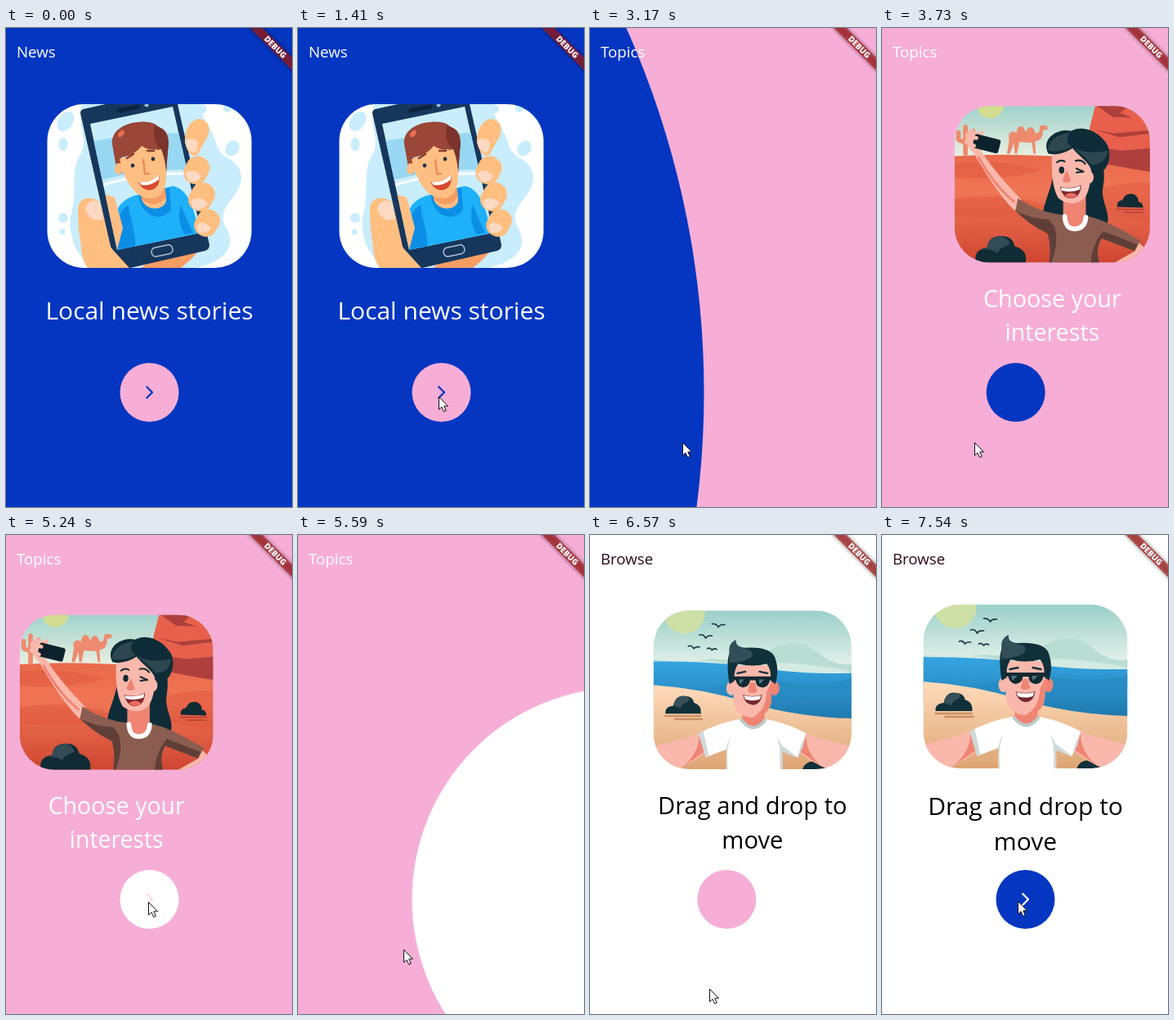
Write an HTML page that moves like this. It is 350 px wide and 585 px high and loops after 8 s.

```html
<!DOCTYPE html>
<html lang="en">
<head>
<meta charset="utf-8">
<title>Onboarding</title>
<style>
  html, body { margin: 0; width: 100%; height: 100%; overflow: hidden; }
  svg { display: block; width: 350px; height: 585px; }
  text { font-family: "Open Sans", "Noto Sans", sans-serif; font-weight: 440; }
  .head { font-size: 30px; text-anchor: middle; fill: #fff; }
  .dark { fill: #000; }
  #title { font-size: 18.7px; }
  #debug { font-size: 9.8px; font-weight: 800; text-anchor: middle; fill: #fff; }
  .line { fill: none; stroke-linecap: round; stroke-linejoin: round; }
</style>
</head>
<body>
<svg viewBox="0 0 350 585">
  <defs>
    <clipPath id="card"><rect width="250" height="200" rx="45"/></clipPath>
    <clipPath id="screen"><path d="M103 117L204 96L239 250L136 271Z"/></clipPath>
    <linearGradient id="dusk" x2="0" y2="1"><stop stop-color="#9fd2cc"/><stop offset="1" stop-color="#f0f2e2"/></linearGradient>
    <linearGradient id="desert" x2="0" y2="1"><stop stop-color="#e9694b"/><stop offset=".35" stop-color="#f07555"/><stop offset="1" stop-color="#cf4631"/></linearGradient>
    <linearGradient id="air" x2="0" y2="1"><stop stop-color="#9ad0c8"/><stop offset="1" stop-color="#f3f8f2"/></linearGradient>
    <linearGradient id="sea" x2="0" y2="1"><stop stop-color="#35a5e2"/><stop offset="1" stop-color="#1f78ad"/></linearGradient>
    <linearGradient id="sand" x2="0" y2="1"><stop stop-color="#ffdcbc"/><stop offset="1" stop-color="#dda473"/></linearGradient>
    <filter id="soft" x="-20%" y="-80%" width="140%" height="260%"><feGaussianBlur stdDeviation="2.6"/></filter>
  </defs>

  <rect id="bg" width="350" height="585"/>
  <circle id="disc"/>
  <path id="arrow" class="line" stroke-width="2.3" d="M172.3 438.3L179 445L172.3 451.7"/>

  <g class="page">
    <g transform="translate(50.5 93)"><g clip-path="url(#card)"><g transform="translate(-50.5 -93)">
      <path fill="#fff" d="M50 92h252v202H50z"/>
      <g fill="#c9edfc">
        <path d="M93 93C86 120 101 132 92 153C78 172 87 200 81 222C73 250 86 285 112 293L232 293C274 284 282 262 268 242C257 217 288 207 288 182C286 156 262 164 257 140C250 118 240 112 236 93Z"/>
        <ellipse cx="73" cy="114" rx="9" ry="13" transform="rotate(35 73 114)"/>
        <ellipse cx="70" cy="142" rx="5.5" ry="8"/>
        <ellipse cx="277" cy="147" rx="8" ry="10" transform="rotate(35 277 147)"/>
        <ellipse cx="237" cy="99" rx="9" ry="6"/>
        <circle cx="271" cy="98" r="5"/><circle cx="70" cy="232" r="6"/><circle cx="69" cy="249" r="3.5"/>
      </g>
      <path fill="#f79d62" d="M208 262L248 252C238 272 228 282 214 293H165Z"/>
      <path fill="#ffbf80" d="M88 222C88 206 104 204 114 214L136 270L150 293H100C90 265 88 245 88 222Z"/>
      <path fill="#17365c" d="M91 104Q91 100 95 99L122 93H210L249 265Q249 270 244 272L152 293H134Z"/>
      <path class="line" stroke="#0c2440" stroke-width="5" d="M138 101L162 96"/>
      <circle cx="172" cy="94" r="2.5" fill="#9fb9cf"/>
      <g clip-path="url(#screen)">
        <path fill="#c9edfb" d="M95 90h150v190H95z"/>
        <path fill="#98d8f2" d="M100 139Q150 130 215 128L222 173Q165 172 116 186Z"/>
        <path class="line" stroke="#fff" stroke-width="3" d="M112 194Q165 176 226 178"/>
        <path fill="#1eb1f9" d="M132 262C128 222 140 208 164 203L204 193C220 196 228 210 238 255L136 275Z"/>
        <path fill="#0d8ee6" d="M136 271L132 250C138 228 142 220 150 216C152 236 160 252 158 267ZM218 252Q208 232 214 216Q222 236 229 250ZM163 203C162 228 190 240 202 222L200 195Z"/>
        <path fill="#ffbd82" d="M165 191L166 209C172 226 196 222 196 210L193 186Z"/>
        <path fill="#f79d62" d="M165 199Q184 215 194 194L196 206Q184 223 166 209Z"/>
        <path fill="#ffbe83" d="M120 203L133 207L143 244L136 271H126Z"/>
      </g>
      <path fill="#9a4638" d="M130 142C128 128 142 116 162 115C178 113 186 119 186 121C197 123 201 134 198 148L196 177L189 180L184 148L141 158L142 178L136 176Z"/>
      <path fill="#7b332b" d="M182 119C196 122 201 136 198 150L196 178L190 179L188 147Q179 138 182 119Z"/>
      <ellipse cx="138" cy="172" rx="5" ry="7" fill="#ffbd82"/>
      <path fill="#ffbf83" d="M139 160Q158 155 166 144Q177 151 190 148C199 172 199 199 184 207C164 212 147 196 139 160Z"/>
      <ellipse cx="141" cy="129" rx="3" ry="5" fill="#e96f4f" transform="rotate(40 141 129)"/>
      <g class="line" stroke="#8a3d30" stroke-width="2.5"><path d="M148 159L156 154M173 150L181 150"/><path stroke="#f28a55" d="M168 161L170 178L175 178"/></g>
      <circle cx="155" cy="168" r="2.4" fill="#23314d"/><circle cx="180" cy="160" r="2.4" fill="#23314d"/>
      <path fill="#d8492f" d="M162 188Q177 190 187 179C190 193 181 199 174 198Q166 197 162 188Z"/>
      <path fill="#fff" d="M163 188Q177 190 187 179L187 185Q178 193 166 192Z"/>
      <rect x="178" y="266.5" width="26" height="11" rx="5" fill="none" stroke="#a9bfd2" stroke-width="1.5" transform="rotate(-12 191 272)"/>
      <path fill="#ffbf80" d="M90 228C84 210 104 202 115 213C121 233 120 258 130 270L151 293H100C87 276 94 253 90 228Z"/>
      <path fill="#fbd9c3" d="M97 222C98 211 110 208 115 214L119 233Q104 239 97 222Z"/>
      <g fill="#ffbf80">
        <path d="M219 139C218 126 225 113 235 111C247 111 251 122 247 132L234 155Q223 159 219 139Z"/>
        <rect x="219" y="156" width="29" height="35" rx="14" transform="rotate(26 233 173)"/>
        <rect x="225" y="188" width="29" height="36" rx="14" transform="rotate(30 239 206)"/>
        <rect x="232" y="221" width="28" height="34" rx="13" transform="rotate(30 246 238)"/>
      </g>
      <path fill="#fbd9c3" d="M219 139Q225 131 235 139L233 151Q222 154 219 139ZM219 177Q230 170 239 181Q232 192 223 186ZM226 211Q237 203 247 214Q239 225 229 220ZM233 241Q242 233 251 245Q243 253 235 249Z"/>
    </g></g></g>
    <text class="head" x="175.5" y="356">Local news stories</text>
  </g>

  <g class="page">
    <g transform="translate(50.5 85)"><g clip-path="url(#card)">
      <path fill="url(#dusk)" d="M0 0h250v70H0z"/>
      <circle cx="46" cy="-1" r="17" fill="#d3dc92"/>
      <path fill="url(#desert)" d="M0 64Q50 61 100 63T250 68V200H0Z"/>
      <path fill="#da5038" d="M0 74Q50 66 110 82Q70 96 0 91ZM0 119Q70 108 130 132Q60 150 0 139ZM170 110Q220 95 250 98V148Q200 142 170 132Z" opacity=".4"/>
      <path fill="#e8604c" d="M180 0H250V74L166 62L174 23Z"/>
      <path fill="#ad403d" d="M168 50L214 57L250 54V84Q210 78 166 68ZM182 0H222L212 9L228 15L202 14ZM178 30L204 35L250 31V35L211 40Z"/>
      <g fill="#ee8b6e">
        <path d="M67 61L70 43C67 34 75 30 79 35C81 23 88 23 91 33C96 23 101 27 103 34Q109 37 109 27Q110 23 119 26L119 30L113 31Q113 45 103 45L104 61H101L99 47L83 46L80 61H77L76 48L71 61Z"/>
        <path class="line" stroke="#ee8b6e" stroke-width="6" d="M14 61V27M5 34V42Q5 45 14 46M24 32V42Q23 47 14 48"/>
      </g>
      <g fill="#f9b8ab">
        <path d="M22 56L35 59C51 83 69 103 85 119L77 134C58 115 39 85 22 56Z"/>
        <path d="M14 36L22 29L30 34L37 31L36 46L34 59L22 58Q13 48 14 36Z"/>
      </g>
      <path class="line" stroke="#ef8473" stroke-width="3" d="M31 66Q52 103 76 122"/>
      <rect x="24" y="39" width="34" height="18" rx="3" fill="#0d222c" transform="rotate(14 40 48)"/>
      <path class="line" stroke="#f9b8ab" stroke-width="5" d="M15 46L25 51M18 39L28 41"/>
      <path fill="#0d2c37" d="M127 81C126 105 110 128 113 148L194 154C202 137 186 123 190 103C194 84 188 65 183 60Z"/>
      <path fill="#ef8473" d="M139 113H168V147Q152 166 139 147Z"/>
      <path fill="#f9b8ab" d="M125 54L174 55C176 84 175 106 166 118Q151 131 133 118C123 101 124 75 125 54Z"/>
      <path fill="#0d2c37" d="M120 61C110 42 132 28 149 32C165 23 187 34 196 51C202 67 195 88 176 89C176 73 162 68 151 54Q136 64 120 61Z"/>
      <path fill="#2d4650" d="M119 57Q121 38 148 34Q139 44 150 52Q134 60 119 57ZM151 53Q169 63 196 57Q193 75 175 75Q166 63 151 53Z"/>
      <ellipse cx="172" cy="91" rx="6" ry="8" fill="#f9b8ab"/>
      <ellipse cx="137" cy="82" rx="3.4" ry="4.5" fill="#112b35"/>
      <g class="line" stroke="#112b35" stroke-width="2.2"><path d="M131 72Q136 68 141 71M155 70Q163 68 167 74M156 80L165 84L156 85"/></g>
      <path fill="#ef8473" d="M144 82L149 96Q141 101 138 94Z"/>
      <path fill="#7c2830" d="M135 103Q149 107 162 101Q161 118 148 118Q138 117 135 103Z"/>
      <path fill="#fff" d="M136 104Q149 107 161 102L160 107Q149 111 137 108Z"/>
      <path fill="#ec6c60" d="M141 114Q149 108 157 114Q149 121 141 114Z"/>
      <path fill="#8a5d50" d="M81 118Q110 137 139 139Q153 170 169 141Q188 142 238 172L230 185L188 169Q180 185 185 200H121Q124 177 119 163Q96 152 78 134Z"/>
      <path fill="#603e38" d="M78 134Q96 144 121 145L128 155Q134 173 124 200H121Q124 177 119 163Q96 152 78 134ZM188 169Q180 181 185 200H174Q177 175 190 160L234 177L230 185Z"/>
      <path class="line" stroke="#fff" stroke-width="6" d="M141 141Q142 158 155 157Q167 156 168 142"/>
      <path fill="#f9b8ab" d="M236 175L243 181Q237 190 220 200H205L231 185Z"/>
      <path fill="#112b35" d="M27 198Q25 183 42 181Q43 166 60 166Q74 166 77 179Q94 184 91 200H27Z"/>
      <path fill="#334b55" d="M42 181Q43 167 60 166Q71 170 70 177Q56 182 55 188Q45 181 32 184Z"/>
      <path fill="#112b35" d="M208 129Q207 121 215 120Q219 110 230 113Q236 117 235 122Q242 124 241 130Z"/>
      <path class="line" stroke="#b83f34" stroke-width="1.6" d="M207 132H242M216 136H241"/>
    </g></g>
    <text class="head" x="175.5" y="342">Choose your</text>
    <text class="head" x="175.5" y="385">interests</text>
  </g>

  <g class="page">
    <g transform="translate(50.5 85)"><g clip-path="url(#card)">
      <path fill="url(#air)" d="M0 0h250v85H0z"/>
      <circle cx="39" cy="3" r="26" fill="#cfe0a6"/>
      <path fill="#b9ddd3" d="M0 62Q45 65 75 61Q120 66 151 48C174 36 190 40 206 52Q229 71 250 67V100H0Z"/>
      <path fill="#d4eae3" d="M0 64Q60 59 102 69Q170 60 250 77V100H0Z"/>
      <path fill="url(#sea)" d="M0 64Q80 64 130 72T250 79V138L0 120Z"/>
      <path fill="#2789c2" d="M60 104Q110 83 165 89T250 86V104Q170 116 60 104Z" opacity=".6"/>
      <path fill="url(#sand)" d="M0 94Q60 98 120 116T250 136V200H0Z"/>
      <path class="line" stroke="#1d3941" stroke-width="1.7" d="M74 17Q79 16 82 21Q84 17 90 18M58 31Q63 29 66 35Q68 31 74 32M44 45Q48 43 51 48Q53 45 58 46M68 48Q71 46 74 50Q76 47 80 49"/>
      <path fill="#10303a" d="M15 130Q14 121 25 120Q28 105 42 108Q50 109 51 116Q61 119 60 130Z"/>
      <path fill="#37505a" d="M25 120Q28 107 41 108Q49 111 43 115Q35 117 35 123Z"/>
      <path class="line" stroke="#c98f63" stroke-width="2.5" d="M15 133H59M27 137H61"/>
      <path fill="#10303a" d="M188 200Q191 190 203 190L218 194V200Z"/>
      <path fill="#f9b8ab" d="M62 153Q35 163 0 171V200H30Q53 190 68 177ZM188 153Q215 163 250 171V200H220Q197 190 182 177Z"/>
      <path fill="#ef8473" d="M57 155L67 176L36 198Q60 178 57 155ZM193 155L183 176L214 198Q190 178 193 155Z"/>
      <path fill="#fff" d="M57 155Q80 142 109 137H142Q170 142 193 155L182 185L160 175V200H92V175L66 185Z"/>
      <path fill="#cdd9d9" d="M57 155L63 152L70 184L66 185ZM160 200V177Q158 163 154 155L162 170L182 185L186 170L193 155L189 171L182 186L163 178V200ZM92 200V175Q93 166 98 158Q91 175 94 200Z"/>
      <path fill="#ef8473" d="M112 126H140V139Q126 153 112 139Z"/>
      <path class="line" stroke="#bccaca" stroke-width="4" d="M111 138Q126 157 141 138"/>
      <ellipse cx="98" cy="98" rx="6" ry="9" fill="#f9b8ab"/><ellipse cx="153" cy="98" rx="6" ry="9" fill="#ef8473"/>
      <path fill="#f9b8ab" d="M101 69H149V112Q147 134 125 135Q103 134 101 112Z"/>
      <path fill="#ef8473" d="M149 90V112Q147 134 125 135Q142 126 143 103Z"/>
      <path fill="#10303a" d="M96 93C93 74 93 61 96 54Q94 42 104 37Q103 46 115 47Q150 45 154 61Q159 75 154 93L148 88Q149 74 143 67Q125 72 107 67Q101 75 102 89Z"/>
      <path fill="#334e58" d="M96 54Q95 42 104 37Q103 46 115 48Q126 49 125 57Q118 65 96 66Z"/>
      <path class="line" stroke="#10303a" stroke-width="2.4" d="M106 79L116 77M134 77L144 79"/>
      <path fill="#112831" d="M101 83H150V87L147 88Q145 97 137 97Q129 96 129 88H122Q121 96 113 97Q106 96 104 88L101 87Z"/>
      <path fill="#4f7480" d="M108 87H115L109 93ZM133 87H140L134 93Z"/>
      <path fill="#ef8473" d="M122 91H128L131 102Q125 106 119 102Z"/>
      <path fill="#712730" d="M113 106Q125 110 137 106Q135 119 125 119Q115 118 113 106Z"/>
      <path fill="#fff" d="M114 107Q125 110 136 107L134 112Q125 115 116 112Z"/>
    </g></g>
    <text class="head dark" x="175.5" y="342">Drag and drop to</text>
    <text class="head dark" x="175.5" y="385">move</text>
  </g>

  <text id="title" x="13" y="36"></text>

  <g transform="translate(350 0) rotate(45)">
    <rect x="-40" y="25.5" width="80" height="10.9" fill="#000" opacity=".5" filter="url(#soft)"/>
    <rect x="-40" y="25.5" width="80" height="10.9" fill="#b71c1c" opacity=".63"/>
    <text id="debug" x="2" y="34.4">DEBUG</text>
  </g>

  <path id="cursor" fill="#fff" stroke="#111" stroke-width="1" d="M.5 .5V16L4 12.8L6.6 18.5L9.3 17.3L6.8 11.8H11.5Z"/>
</svg>

<script>
const LOOP = 8000, SPAN = 1690, STARTS = [2208, 5030];
const COLORS = ['#0536c1', '#f6aed6', '#ffffff'];
const TITLES = ['News', 'Topics', 'Browse'];
const TITLE_INK = ['#fff', '#fff', '#2b0b1f'];
const CX = 175.5, CY = 445, R = 36, ZOOM = 84;
const REST = .197;   // share of the change, at each end, in which the disc keeps its size

// time, x, y of the pointer tip
const TRAIL = [
  [760, 266, 568], [1410, 172, 450], [2620, 172, 450], [3000, 113, 506],
  [3900, 113, 506], [4700, 174, 448], [5260, 174, 448], [5560, 129, 506],
  [5640, 129, 506], [6000, 146, 554], [6940, 146, 554], [7400, 173, 455], [7540, 166, 447]
];

const $ = id => document.getElementById(id);
const set = (el, attrs) => { for (const k in attrs) el.setAttribute(k, attrs[k]); };
const clamp = x => Math.min(1, Math.max(0, x));
const mix = (a, b, k) => a + (b - a) * k;

function bezier(x1, y1, x2, y2) {
  const at = (a, b, u) => 3 * a * u * (1 - u) ** 2 + 3 * b * u * u * (1 - u) + u ** 3;
  return x => {
    let lo = 0, hi = 1;
    for (let i = 0; i < 30; i++) {
      const mid = (lo + hi) / 2;
      if (at(x1, x2, mid) < x) lo = mid; else hi = mid;
    }
    return at(y1, y2, lo);
  };
}
const inOutQuint = bezier(.83, 0, .17, 1);

const pages = [...document.querySelectorAll('.page')];
const bg = $('bg'), disc = $('disc'), arrow = $('arrow'), title = $('title'), cursor = $('cursor');

// Grows from its left edge, then shrinks to its right edge and slides home.
function placeDisc(v) {
  const r = R * ZOOM ** clamp((Math.min(v, 1 - v) - REST) / (.5 - REST));
  const slide = inOutQuint(clamp((v - .75) * 4));
  const x = v < .5 ? CX - R + r : CX - R + 2 * R * slide - r;
  set(disc, { cx: x, cy: CY, r });
}

function placePage(el, offset) {
  const away = Math.abs(offset);
  el.style.display = away < 1 ? '' : 'none';
  set(el, { transform: `translate(${CX + offset * 350} 320) scale(${1 - .46 * away}) translate(${-CX} -320)` });
}

function placeCursor(t) {
  cursor.style.display = t < 790 ? 'none' : '';
  let i = TRAIL.findIndex(p => p[0] > t);
  if (i < 0) i = TRAIL.length - 1;
  const a = TRAIL[Math.max(0, i - 1)], b = TRAIL[i];
  const k = clamp((t - a[0]) / (b[0] - a[0] || 1));
  const e = k * k * (3 - 2 * k);
  set(cursor, { transform: `translate(${mix(a[1], b[1], e)} ${mix(a[2], b[2], e)})` });
}

function draw(t) {
  let page = 0, v = 0;
  for (const s of STARTS) {
    if (t >= s + SPAN) page++;
    else if (t >= s) v = (t - s) / SPAN;
  }
  const swapped = v >= .5, shown = page + swapped;
  const next = COLORS[(page + 1) % 3];

  set(bg, { fill: COLORS[shown] });
  set(disc, { fill: swapped ? COLORS[page] : next });
  set(arrow, { stroke: COLORS[page], opacity: clamp(1 - v / .22) });
  title.textContent = TITLES[shown];
  set(title, { fill: TITLE_INK[shown] });

  placeDisc(v);
  const leave = 27.2 * v ** 2.626, enter = 97.2 * (1 - v) ** 3;
  pages.forEach((el, i) => {
    const offset = i === page ? -leave : i === page + 1 && v > 0 ? enter : 1;
    placePage(el, offset);
  });
  placeCursor(t);
}

const begin = performance.now();
function tick() {
  draw((performance.now() - begin) % LOOP);
  requestAnimationFrame(tick);
}
tick();
</script>
</body>
</html>
```
